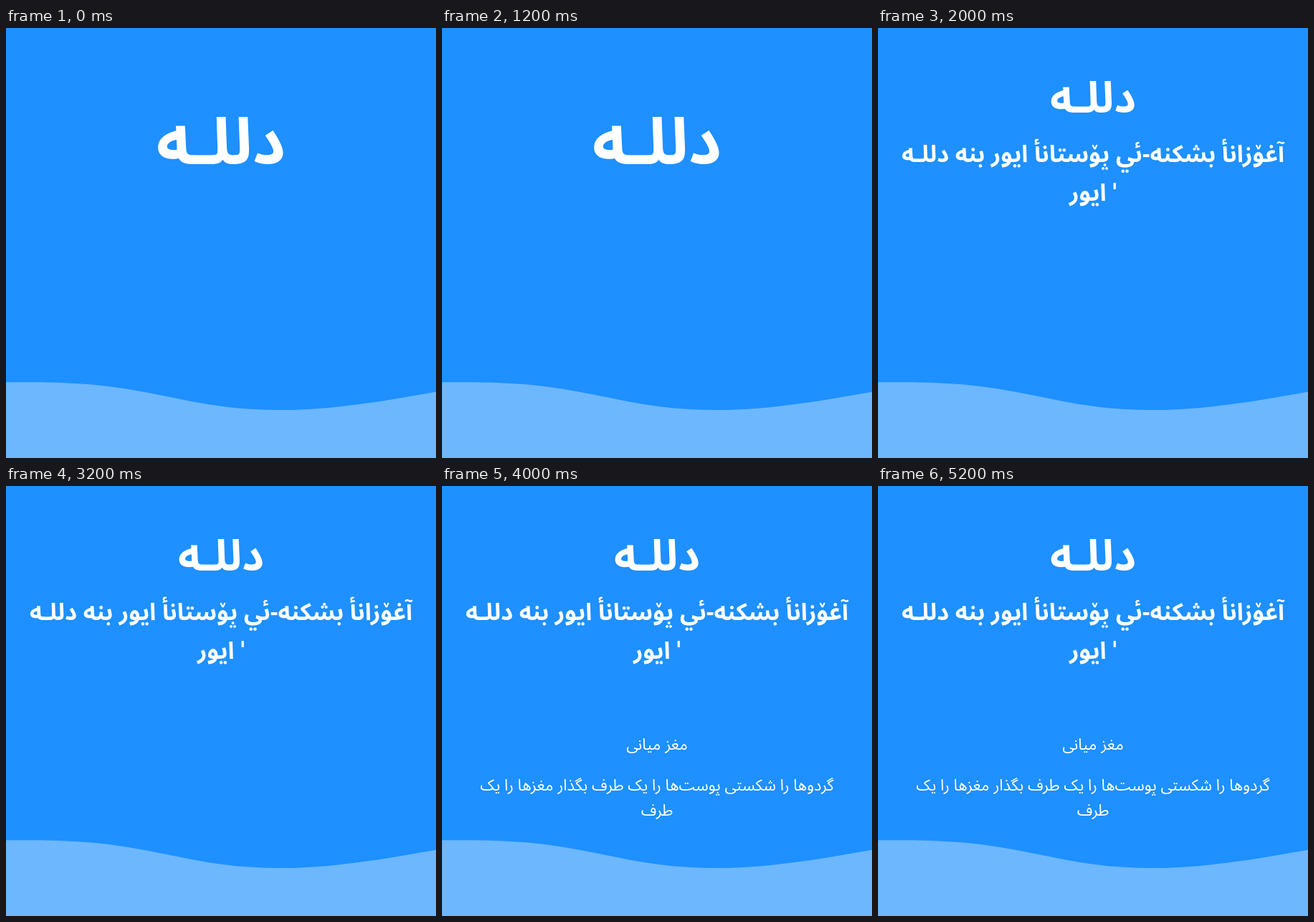
These frames come from a looping animation (600x600 px, 6 s). An HTML page with a canvas:

```html
<!DOCTYPE html>
<html lang="fa">
<head>
<meta charset="utf-8">
<style>
html, body { margin: 0; width: 100%; height: 100%; overflow: hidden; background: #1e90ff; }
canvas { display: block; }
</style>
</head>
<body>
<canvas id="stage" width="600" height="600"></canvas>
<script>
const ctx = document.getElementById('stage').getContext('2d');
const FONT = '"Vazirmatn", "Noto Sans Arabic", "Noto Sans", "DejaVu Sans", sans-serif';
const STEP = 2000, STEPS = 3;
const NON_JOINER = String.fromCharCode(8204);

function line(text, baseline, size, weight = 400) {
  ctx.font = `${weight} ${size}px ${FONT}`;
  ctx.fillText(text, 300, baseline);
}

// Uniform cubic B-spline through evenly spaced control heights.
function wave(heights, width, top, scale) {
  const last = heights.length - 1, dx = width / last;
  const y = v => top + v * scale;
  const knot = i => (heights[i - 1] + 4 * heights[i] + heights[i + 1]) / 6;
  ctx.beginPath();
  ctx.moveTo(0, y(heights[0]));
  ctx.lineTo(dx / 6, y((5 * heights[0] + heights[1]) / 6));
  for (let i = 0; i < last; i++) {
    const a = heights[i], b = heights[i + 1], end = i === last - 1;
    ctx.bezierCurveTo(
      (i + 1 / 3) * dx, y((2 * a + b) / 3),
      (i + 2 / 3) * dx, y((a + 2 * b) / 3),
      end ? width - dx / 6 : (i + 1) * dx, y(end ? (a + 5 * b) / 6 : knot(i + 1)));
  }
  ctx.lineTo(width, y(heights[last]));
  ctx.lineTo(width, 600);
  ctx.lineTo(0, 600);
  ctx.fill();
}

function draw(step) {
  ctx.fillStyle = '#1e90ff';
  ctx.fillRect(0, 0, 600, 600);
  ctx.fillStyle = 'rgba(255, 255, 255, 0.35)';
  wave([64, 64, 160, 160, 96], 600, 467.67, 600 / 1440);

  ctx.fillStyle = '#fff';
  ctx.textAlign = 'center';
  ctx.direction = 'rtl';
  if (step === 0) {
    line('دللـه', 190, 90, 700);
    return;
  }
  line('دللـه', 118, 60, 700);
  line('آغۆزانأ بشکنه-ئي پۆستانأ ايور بنه دللـه', 187, 33, 700);
  line('ˈ ايور', 241, 33, 700);
  if (step === 2) {
    line('مغز میانی', 368, 22);
    line(`گردوها را شکستی پوست${NON_JOINER}ها را یک طرف بگذار مغزها را یک`, 425, 22);
    line('طرف', 460, 22);
  }
}

function tick() {
  draw(Math.floor(performance.now() / STEP) % STEPS);
  requestAnimationFrame(tick);
}
tick();
</script>
</body>
</html>
```
